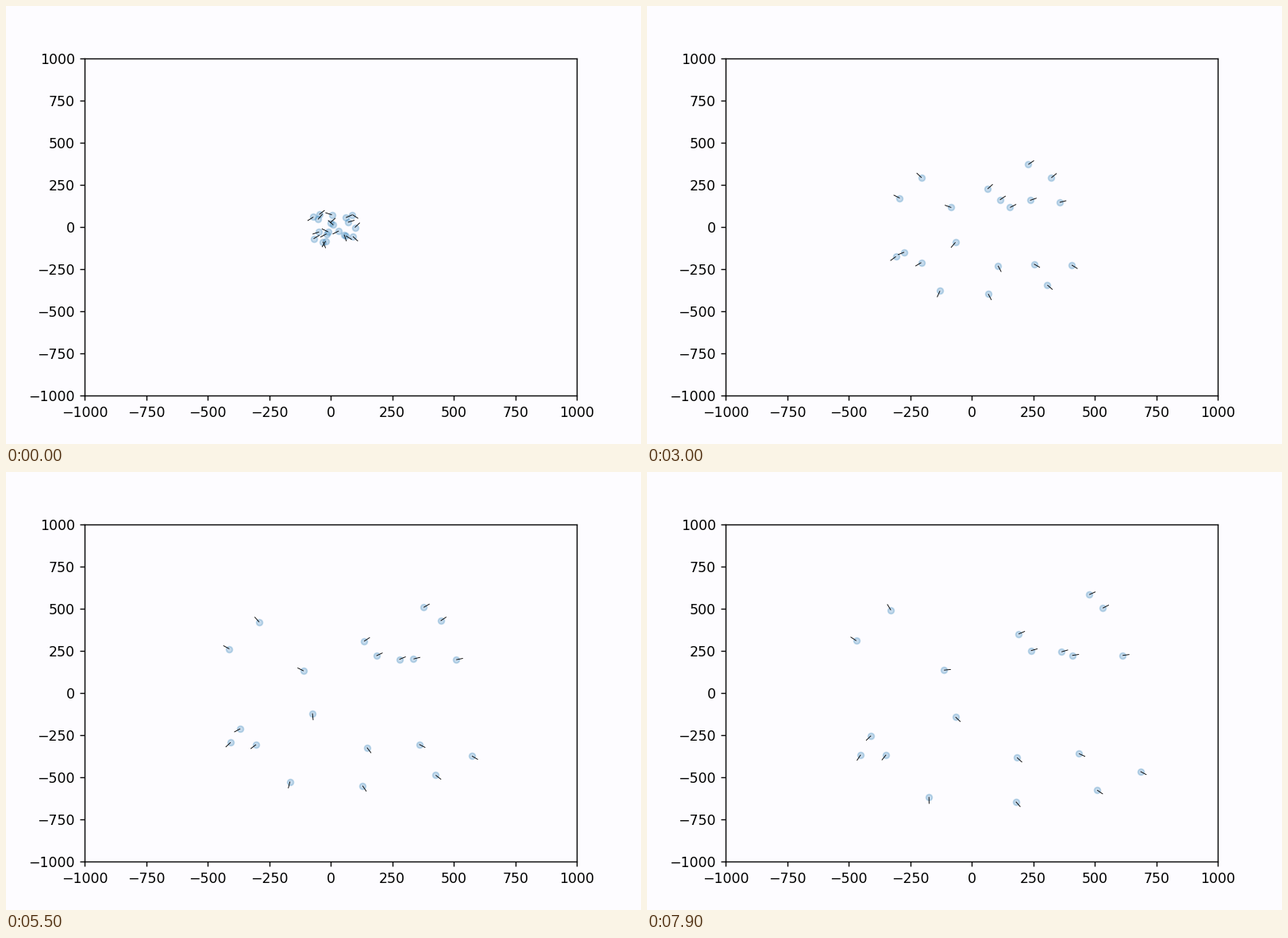
A matplotlib script that plays this animation: 800 px wide and 551 px high, repeating every 8 s.

```python
import numpy as np
import matplotlib.pyplot as plt
from matplotlib.animation import FuncAnimation

FRAMES, INTERVAL = 80, 100
EARLY, LATE = 10, 79            # steps of the two key points
DECAY = 0.02                    # how fast birds brake towards the flock's speed
ARROW = 8.6                     # heading length in pixels
WHITE = "#fdfcff"

# Key points of each bird, in pixels right of and below the axes' centre
BIRDS = np.array([
    (19, -41.5, 148, -124), (-24.5, -27, -102, -104.5),
    (-10.5, -19.5, -35, -29), (-2.5, -25.5, 59, -74.5),
    (-39.5, -11.5, -145.5, -66), (13, -17.5, 74.5, -53.5),
    (40, -21, 126.5, -47.5), (57.5, -25, 165, -107),
    (56.5, -16.5, 190, -47.5), (5.5, -1.5, 113, -52),
    (-52.5, 7, -140, 77.5), (-44, 16, -127, 53.5),
    (-20.5, 20.5, -108, 77.5), (-12.5, 12.5, -20.5, 30),
    (66, 9.5, 212.5, 98.5), (22.5, 25, 57, 81),
    (42, 25, 135, 76), (54, 36, 158, 122),
    (-21, 42.5, -54, 130.5), (1.5, 44.5, 55.5, 136.5),
])
early, late = np.hsplit(BIRDS, 2)

# The flock's mean drifts steadily; each bird's own velocity fades into it
drift = (late - early).mean(axis=0) / (LATE - EARLY)
fade = np.exp(-DECAY * EARLY) - np.exp(-DECAY * LATE)
spread = (late - early - drift * (LATE - EARLY)) / fade


def position(t):
    travelled = np.exp(-DECAY * EARLY) - np.exp(-DECAY * t)
    return (early + drift * (t - EARLY) + spread * travelled) / (0.31, -0.2121)


def heading(t):
    v = (drift + spread * DECAY * np.exp(-DECAY * t)) * (1, -1)
    return ARROW * v / np.linalg.norm(v, axis=1, keepdims=True)


fig, ax = plt.subplots(figsize=(6.4, 4.408), dpi=125, facecolor=WHITE)
fig.subplots_adjust(left=0.124, right=0.899, bottom=0.11, top=0.88)
ax.set(xlim=(-1000, 1000), ylim=(-1000, 1000), facecolor=WHITE)

xy = position(0)
dots = ax.scatter(*xy.T, s=20, linewidths=1, alpha=0.25, color="tab:blue")
arrows = ax.quiver(*xy.T, *heading(0).T, units="dots", scale_units="dots",
                   scale=1, width=0.9, headwidth=1, headlength=0,
                   headaxislength=0, color="black", zorder=3)


def update(i):
    xy = position(i)
    dots.set_offsets(xy)
    arrows.set_offsets(xy)
    arrows.set_UVC(*heading(i).T)
    return dots, arrows


anim = FuncAnimation(fig, update, frames=FRAMES, interval=INTERVAL,
                     repeat=True, repeat_delay=0)
plt.show()
```
